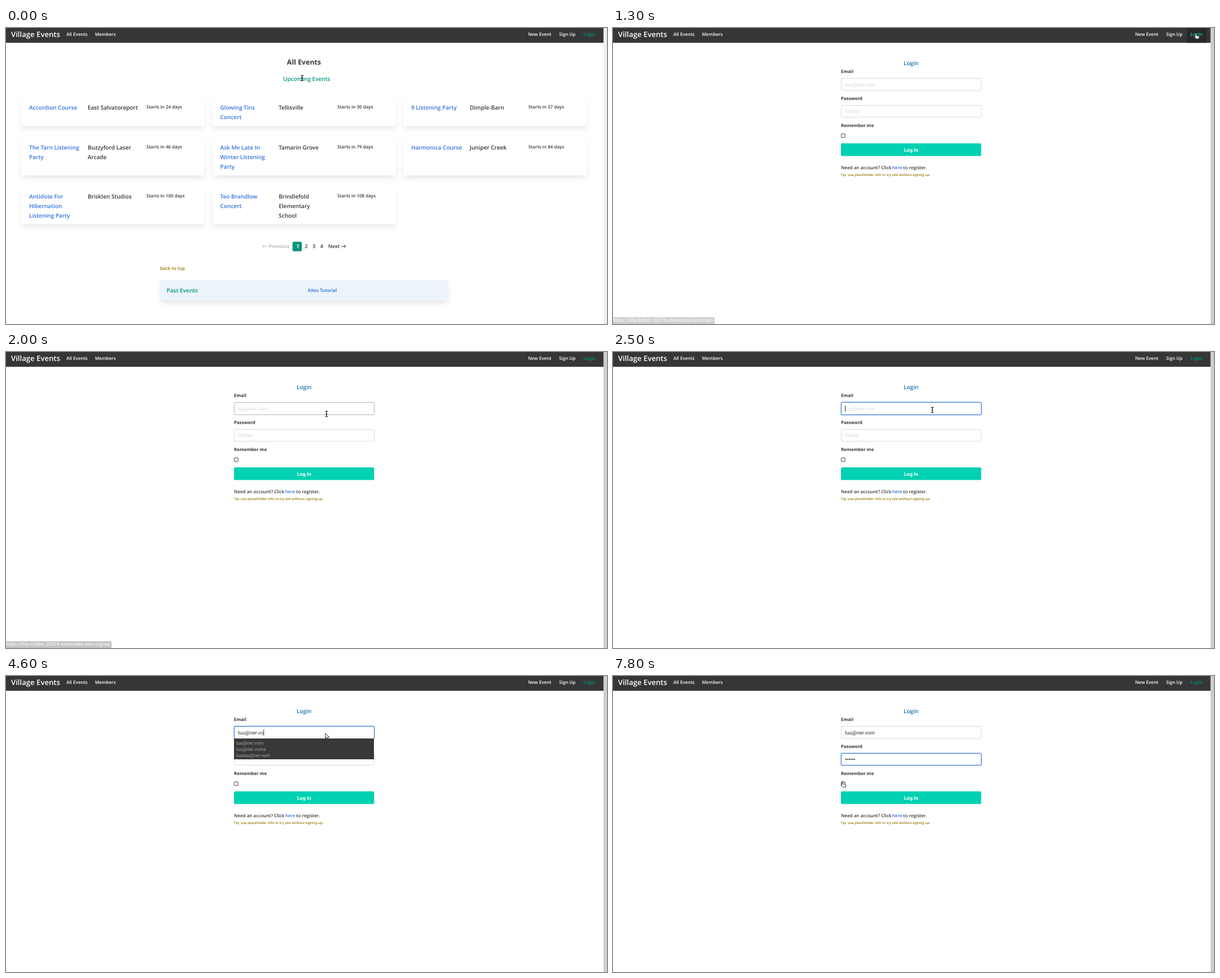
Write an HTML page that moves like this. It is 1065 px wide and 526 px high and loops after 8 s.

```html
<!DOCTYPE html>
<html lang="en">
<head>
<meta charset="utf-8">
<title>Event sign-in</title>
<style>
html, body { margin: 0; width: 100%; height: 100%; overflow: hidden; background: #fff; }
#stage { position: relative; width: 1065px; height: 526px; overflow: hidden; background: #fff; }
#stage div, svg { position: absolute; box-sizing: border-box; }
svg { left: 0; top: 0; width: 1065px; height: 526px; }
text { font-family: "Open Sans", "Noto Sans", sans-serif; font-weight: 600; text-rendering: geometricPrecision; white-space: pre; }
text.ui { font-family: Roboto, Arial, sans-serif; font-weight: 400; }
#stage .page { inset: 0; }
.card { background: #fff; border-radius: 3.4px; box-shadow: 0 5.6px 11px -1.4px rgba(10,10,10,.1), 0 0 0 .6px rgba(10,10,10,.02); }
.tint { background: #ebf4fb; }
.field { border: 1px solid #dbdbdb; border-radius: 2.3px; background: #fff; }
.field.hover { border-color: #b5b5b5; }
.field.focus { border-color: #3273dc; box-shadow: 0 0 0 1.1px rgba(50,115,220,.25); }
#status { left: 0; bottom: 0; height: 12px; padding-right: 2px; background: #636363; color: #fff; border-radius: 0 2px 0 0;
  font: 8.62px/12px Roboto, Arial, sans-serif; white-space: nowrap; text-rendering: geometricPrecision; }
</style>
</head>
<body>
<div id="stage"></div>
<script>
const NS = 'http://www.w3.org/2000/svg';
const LOOP = 8000, TICK = 100;
const DARK = '#363636', LINK = '#3273dc', TEAL = '#00947e', GOLD = '#947600';
const stage = document.getElementById('stage');

function box(parent, x, y, w, h, cls, bg) {
  const el = document.createElement('div');
  el.className = cls || '';
  Object.assign(el.style, { left: x + 'px', top: y + 'px', width: w + 'px', height: h + 'px' });
  if (bg) el.style.background = bg;
  parent.appendChild(el);
  return el;
}
function node(parent, tag, attrs) {
  const el = document.createElementNS(NS, tag);
  for (const k in attrs) el.setAttribute(k, attrs[k]);
  parent.appendChild(el);
  return el;
}
function text(parent, x, y, str, size, fill, extra) {
  const el = node(parent, 'text', { x, y, 'font-size': size, fill, ...extra });
  el.textContent = str;
  return el;
}
function page() {
  const el = document.createElement('div');
  el.className = 'page';
  stage.appendChild(el);
  return el;
}
const show = (el, on) => { el.style.display = on ? '' : 'none'; };
const MID = { 'text-anchor': 'middle' };
const UI = { class: 'ui' };
const BOLD = { style: 'font-weight:700' };

// Event list
const events = page();
const cards = [
  ['Accordion Course', 'East Salvatoreport', 24],
  ['Glowing Tins|Concert', 'Tellisville', 30],
  ['9 Listening Party', 'Dimple-Barn', 37],
  ['The Tarn Listening|Party', 'Buzzyford Laser|Arcade', 46],
  ['Ask Me Late In|Winter Listening|Party', 'Tamarin Grove', 79],
  ['Harmonica Course', 'Juniper Creek', 84],
  ['Antidote For|Hibernation|Listening Party', 'Brisklen Studios', 100],
  ['Teo Brandlow|Concert', 'Brindlefold|Elementary|School', 108]
];
const rows = [[126, 48], [197, 65], [284, 65]];
const cardX = i => 27 + (i % 3) * 338.5;
cards.forEach((c, i) => {
  const [y, h] = rows[Math.floor(i / 3)];
  box(events, cardX(i), y, 325, h, 'card');
});
box(events, 273, 447.5, 510.5, 37.5, 'card tint');

const list = node(events, 'svg', {});
const lines = (x, y, str, fill) => str.split('|').forEach((s, n) => text(list, x, y + n * 17.1, s, 10.05, fill));
text(list, 528, 65.3, 'All Events', 12.4, DARK, { ...MID, ...BOLD });
text(list, 532.7, 93.5, 'Upcoming Events', 10, TEAL, MID);
cards.forEach(([name, place, days], i) => {
  const x = cardX(i), y = rows[Math.floor(i / 3)][0] + 19.2;
  lines(x + 14, y, name, LINK);
  lines(x + 117.7, y, place, DARK);
  text(list, x + 221.8, y - 2.3, `Starts in ${days} days`, 8, DARK);
});
const arrowLine = (x, dir, stroke) => node(list, 'path', {
  d: `M${x} 388h${8 * dir}m${-2.8 * dir}-2.5l${2.8 * dir} 2.5l${-2.8 * dir} 2.5`, fill: 'none', stroke, 'stroke-width': 1
});
arrowLine(463, -1, '#b0b0b0');
text(list, 465.5, 391.3, 'Previous', 9, '#b0b0b0');
node(list, 'rect', { x: 507.7, y: 379.7, width: 16.4, height: 17, rx: 2.2, fill: TEAL });
text(list, 517, 391.3, '1', 9, '#fff', { ...MID, style: 'font-weight:700;font-style:italic' });
['2', '3', '4'].forEach((s, i) => text(list, 532 + i * 13.6, 391.3, s, 9, DARK, MID));
text(list, 570.7, 391.3, 'Next', 9, DARK);
arrowLine(594, 1, DARK);
text(list, 273, 430.2, 'back to top', 8.15, GOLD);
text(list, 284.5, 469.6, 'Past Events', 10.1, TEAL);
text(list, 535, 469, 'Kites Tutorial', 8.05, '#2366d1');

// Login form
const login = page();
const mailField = box(login, 404, 89, 248.5, 22.7, 'field');
const passField = box(login, 404, 136.8, 248.5, 22.7, 'field');
const form = node(login, 'svg', {});
node(form, 'rect', { x: 404.5, y: 188, width: 6.7, height: 6.7, rx: .8, fill: '#fff', stroke: '#444', 'stroke-width': 1 });
node(form, 'rect', { x: 404, y: 205, width: 248.4, height: 22.6, rx: 2.3, fill: '#00d1b2' });
text(form, 528.2, 65.6, 'Login', 10.1, '#1d72aa', MID);
text(form, 404, 80, 'Email', 7.95, DARK, BOLD);
text(form, 404, 128, 'Password', 7.95, DARK, BOLD);
text(form, 404, 175.7, 'Remember me', 7.95, DARK, BOLD);
text(form, 528.2, 219.7, 'Log In', 9, '#fff', { ...UI, ...MID, style: 'font-weight:600' });
text(form, 404, 251, 'Need an account? Click ', 8.05, DARK);
text(form, 494.7, 251, 'here', 8.05, LINK);
text(form, 514.3, 251, 'to register.', 8.05, DARK);
text(form, 404, 262.6, 'Tip: use placeholder info to try site without signing up.', 6.05, GOLD);
const mailText = text(form, 410.8, 103.5, '', 9.07, DARK, UI);
const hint = text(form, 410.8, 151.2, 'foobar', 9.07, '#d8d8d8', UI);
const dots = [...Array(6).keys()].map(i => node(form, 'circle', { cx: 412.7 + 3.05 * i, cy: 148, r: 1.15, fill: DARK }));
const caret = node(form, 'rect', { y: 95, width: .9, height: 11, fill: '#222' });

const MAIL = 'tuu@ner.vom';
const others = ['tuu@nerxxx.vom', 'tuu@ners.vom', 'tuu@ner', 'tuu@ner.voms'];
const double = 'tuu' + MAIL;
const menus = {
  any: [MAIL, double, ...others],
  at: [MAIL, ...others, double],
  few: [MAIL, 'tuu@ner.voms', double]
};
const menu = box(login, 404, 111.3, 248, 70.7, '', '#383838');
const menuSvg = node(login, 'svg', {});
const menuText = [...Array(6).keys()].map(i => text(menuSvg, 407.8, 121.5 + i * 11.4, '', 8.25, '#a3a3a3', UI));

// Top bar and scroll bar
const bar = page();
const nav = node(bar, 'svg', {});
node(nav, 'rect', { width: 1059, height: 26.3, fill: DARK });
const hot = node(nav, 'rect', { height: 26.3, fill: '#292929' });
const scroll = node(nav, 'rect', { x: 1058.8, width: 6.2, height: 526 });
text(nav, 9, 16, 'Village Events', 13.15, '#fff');
text(nav, 107, 14.2, 'All Events', 8.05, '#fff');
text(nav, 157.7, 14.2, 'Members', 8.05, '#fff');
text(nav, 925.3, 14.2, 'New Event', 8.05, '#fff');
text(nav, 980, 14.2, 'Sign Up', 8.05, '#fff');
const loginLink = text(nav, 1023.3, 14.2, 'Login', 8.1, TEAL);
const links = [[918, 973], [973, 1017], [1017, 1052]];

const status = document.createElement('div');
status.id = 'status';
stage.appendChild(status);

// Pointer shapes, each with its hot spot at 0,0
const overlay = node(stage, 'svg', {});
const pointer = node(overlay, 'g', {});
const shapes = {
  beam: node(pointer, 'path', { d: 'M-2.4-4.6h1.6l.8.6l.8-.6h1.6M0-4V4M-2.4 4.6h1.6l.8-.6l.8.6h1.6M-1.2 0h2.4', fill: 'none', stroke: '#222', 'stroke-width': 1.3 }),
  arrow: node(pointer, 'path', { d: 'M0 0V9.6l2.2-2l1.5 3.5l1.6-.7l-1.5-3.4h3z', fill: '#fff', stroke: '#222', 'stroke-width': 1 }),
  hand: node(pointer, 'path', { d: 'M-1.2 1q0-1 1-1t1 1v3l4 .8q1.3.3 1.1 1.6l-.7 3.4h-5l-3-3.6q-.4-1.2.9-1l.7.5z', fill: '#fff', stroke: '#222', 'stroke-width': .9 })
};

// Held poses: time, x, y, shape
const poses = [
  [1000, 1033, 9.5, 'hand'], [1500, 1021, 12, 'hand'], [1600, 992, 16, 'hand'], [1700, 890, 42, 'arrow'],
  [1800, 720, 80, 'arrow'], [1900, 577, 105, 'beam'], [2000, 568, 110, 'beam'], [2100, 567, 108, 'beam'],
  [2200, 566.5, 105, 'beam'], [2300, 566, 103, 'beam'], [3400, 566, 101.7, 'arrow'], [4900, 566, 103, 'beam'],
  [6800, 534, 120, 'arrow'], [7200, 514, 194.5, 'arrow'], [7500, 497, 196.5, 'arrow'], [7800, 407, 187.8, 'hand']
];
// Typed length of the address and the menu under it
const typing = [
  [0, 0], [3400, 2, 'any'], [3600, 3, 'any'], [3800, 4, 'at'], [4000, 5, 'at'], [4200, 6, 'at'],
  [4400, 8, 'at'], [4600, 10, 'few'], [4900, 11]
];
const secret = [[0, 0], [5500, 1], [5700, 2], [6000, 4], [6500, 6]];
const fades = [
  [0, 0, 'login'], [900, .6, 'login'], [1000, 1, 'login'], [1200, .7, 'login'], [1300, .3, 'login'], [1400, .03, 'login'],
  [1500, 0, 'login'], [1600, .5, 'signup'], [1700, 1, 'signup'], [1900, .7, 'signup'], [2000, .38, 'signup'],
  [2100, .17, 'signup'], [2200, .06, 'signup'], [2300, 0, 'signup']
];
const at = (table, t) => table.filter(row => row[0] <= t).pop();

function pose(t) {
  if (t >= 1000) return at(poses, t).slice(1);
  const u = Math.max(0, (t - 100) / 900), e = u * u * (3 - 2 * u);
  const x = 524.7 + 508.3 * e, y = 89 - 79.5 * e;
  return [x, y, t < 300 ? 'beam' : y < 26 ? 'hand' : 'arrow'];
}

function draw(t) {
  const [x, y, shape] = pose(t);
  pointer.setAttribute('transform', `translate(${x} ${y})`);
  for (const k in shapes) show(shapes[k], k === shape);

  const over = y < 26 ? links.findIndex(([a, b]) => x >= a && x < b) : -1;
  show(hot, over >= 0);
  if (over >= 0) {
    const [a, b] = links[over];
    hot.setAttribute('x', a);
    hot.setAttribute('width', b - a);
  }
  loginLink.setAttribute('fill', over === 2 ? '#00d1b2' : TEAL);

  const onForm = t >= 1200;
  show(events, !onForm);
  show(login, onForm);
  scroll.setAttribute('fill', onForm ? '#cdcdcd' : '#eeeeee');

  const [, alpha, path] = at(fades, t);
  status.style.opacity = alpha;
  status.textContent = 'https://tidy-fiddler-20576.vorenunka.vom/' + path;
  if (!onForm) return;

  const [, typed, kind] = at(typing, t);
  const inMail = t >= 2500 && t < 4900, inPass = t >= 4900;
  mailText.textContent = typed ? MAIL.slice(0, typed) : MAIL;
  mailText.setAttribute('fill', typed ? DARK : '#d8d8d8');
  const mailHover = (t >= 1900 && t < 2500) || (t >= 4900 && t < 6800);
  mailField.className = 'field' + (inMail ? ' focus' : mailHover ? ' hover' : '');
  passField.className = 'field' + (inPass ? ' focus' : '');

  const items = menus[kind] || [];
  show(menu, items.length);
  menu.style.height = items.length * 11.4 + 2.3 + 'px';
  menuText.forEach((el, i) => { el.textContent = items[i] || ''; });

  const count = at(secret, t)[1];
  show(hint, !count);
  dots.forEach((d, i) => show(d, i < count));

  show(caret, inMail || (inPass && t < 7500));
  const mailEnd = typed ? mailText.getComputedTextLength() : 0;
  caret.setAttribute('x', 411 + (inPass ? count * 3.05 : mailEnd));
  caret.setAttribute('y', inPass ? 143 : 95);
}

const start = performance.now();
function frame() {
  const t = (performance.now() - start) % LOOP;
  draw(Math.floor(t / TICK) * TICK);
  requestAnimationFrame(frame);
}
frame();
</script>
</body>
</html>
```
